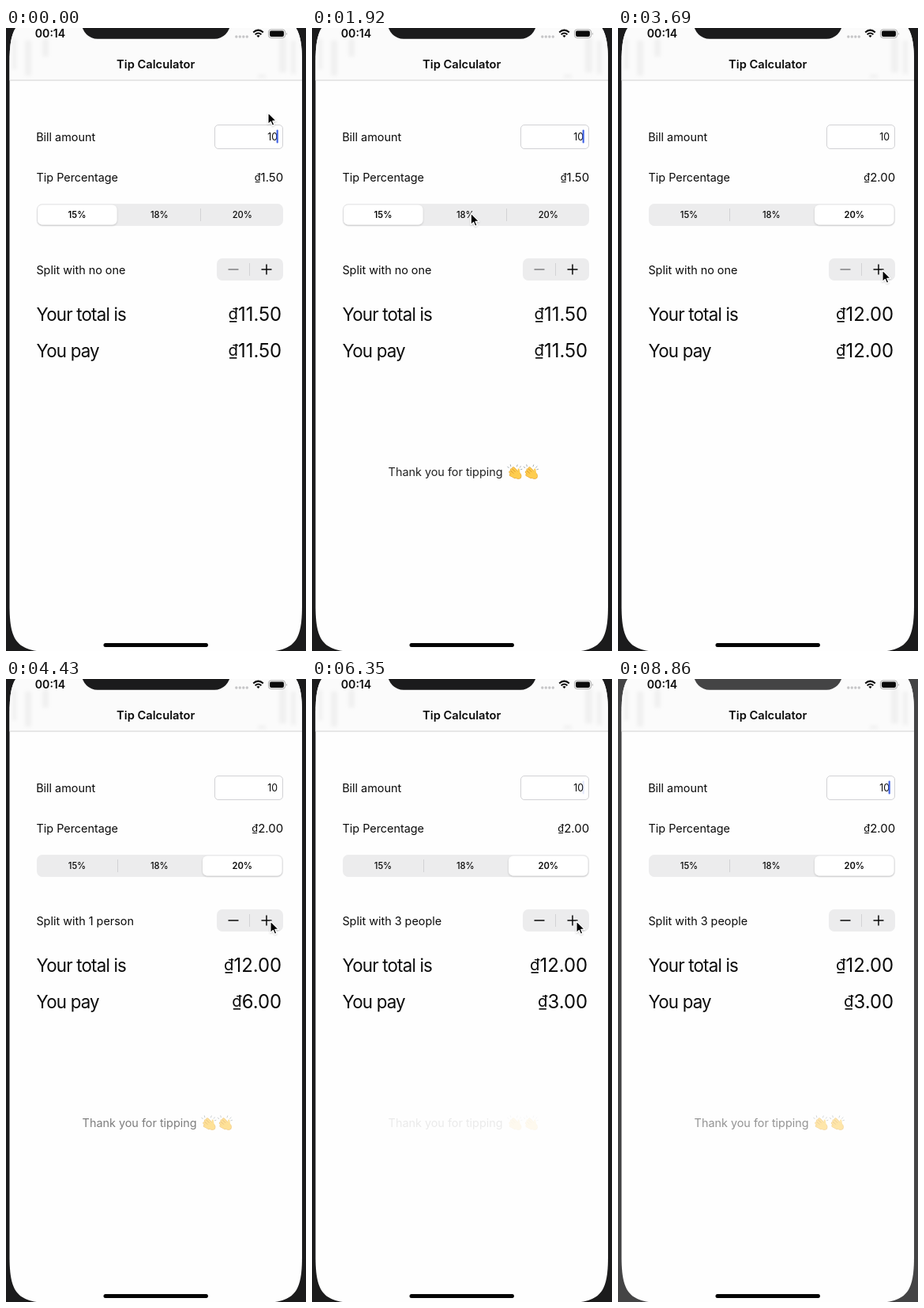
Recreate the animation shown at these times as an HTML page. Size 380 px wide and 787 px high, loop 8.96 s.

```html
<!DOCTYPE html>
<html lang="en">
<head>
<meta charset="utf-8">
<title>Tip Calculator</title>
<style>
  html, body { margin: 0; width: 100%; height: 100%; overflow: hidden; background: #1b1b1c; }
  svg { display: block; width: 380px; height: 787px; }
  text { font: 400 14.4px Inter, Roboto, sans-serif; font-optical-sizing: none; fill: #0a0a0a; }
  .title { font-size: 14.7px; font-weight: 600; text-anchor: middle; }
  .clock { font-size: 14.1px; font-weight: 600; text-anchor: middle; }
  .big { font-size: 22.3px; letter-spacing: -.8px; }
  .money { font-size: 15px; text-anchor: end; }
  .money.sum { font-size: 23.9px; }
  .money tspan:first-child { font-size: .85em; }
  .field { font-size: 12.4px; text-anchor: end; }
  .seg { font-size: 11.2px; font-weight: 500; text-anchor: middle; }
  .seg.on { font-weight: 600; }
  .line { fill: none; stroke: #0a0a0a; stroke-width: 1.5; }
  .sep { stroke: #d2d2d5; stroke-width: 1; }
</style>
</head>
<body>
<svg viewBox="0 0 380 787">
  <defs>
    <clipPath id="screen">
      <path d="M4.5 43C4.5-5.3 15.2-16 63.5-16H316C364.3-16 375-5.3 375 43V729.5C375 777.8 364.3 788.5 316 788.5H63.5C15.2 788.5 4.5 777.8 4.5 729.5Z"/>
    </clipPath>
    <filter id="soft" x="-100%" y="-30%" width="300%" height="160%"><feGaussianBlur stdDeviation="2"/></filter>
    <filter id="shade" x="-20%" y="-30%" width="140%" height="170%">
      <feDropShadow dx="0" dy="1" stdDeviation="1.2" flood-opacity=".2"/>
    </filter>
    <g id="clap" stroke-linecap="round" fill="none">
      <path d="M8 5.5 13.5 11M5.5 7.5 12 13.5M4 10.5 10.5 15.5M4.5 14 10 17" stroke="#e09a1f" stroke-width="3.2"/>
      <ellipse cx="13.2" cy="14.4" rx="5.4" ry="4.2" transform="rotate(40 13.2 14.4)" fill="#ffc83d" stroke="#e09a1f" stroke-width=".6"/>
      <path d="M8 5.5 13.5 11M5.5 7.5 12 13.5M4 10.5 10.5 15.5M4.5 14 10 17M15.5 12 14.7 7.2" stroke="#ffc83d" stroke-width="2.2"/>
      <path d="M2.2 5.2.8 3.6M4.8 3.2 4.3 1.2M12.5 3.4 13.2 1.4M16 4.8 17.6 3.2M17.3 7.3 19 6.8" stroke="#9aa3a8" stroke-width="1"/>
    </g>
  </defs>

  <rect id="bezel" width="380" height="787"/>
  <g clip-path="url(#screen)">
    <rect width="380" height="787" fill="#fefefe"/>
    <rect width="380" height="66" fill="#fbfbfb"/>
    <g fill="#f0f0f0" filter="url(#soft)">
      <rect x="8" y="14" width="5" height="38"/>
      <rect x="24" y="16" width="8" height="44"/>
      <rect x="46" y="14" width="8" height="22"/>
      <rect x="346" y="12" width="9" height="44"/>
      <rect x="361" y="16" width="6" height="42"/>
      <rect x="319" y="59" width="10" height="4"/>
    </g>
    <path d="M0 66H380" stroke="#d2d2d2"/>
  </g>
  <path id="notch" d="M96-6A20 20 0 0 0 116 13.8H264A20 20 0 0 0 284-6Z"/>

  <text class="clock" x="56" y="12">00:14</text>
  <g fill="#c5c5c7">
    <circle cx="291.8" cy="11" r="1.7"/><circle cx="296.3" cy="11" r="1.7"/>
    <circle cx="300.8" cy="11" r="1.7"/><circle cx="305.3" cy="11" r="1.7"/>
  </g>
  <g fill="none" stroke="#0a0a0a" stroke-width="2">
    <path d="M313.2 5.4Q319.5-.2 325.8 5.4M315.6 8.2Q319.5 4.8 323.4 8.2"/>
    <path d="M317.4 9.8Q319.5 8.2 321.6 9.8L319.5 12Z" fill="#0a0a0a" stroke="none"/>
  </g>
  <rect x="332.5" y="2" width="21" height="10.4" rx="3" fill="none" stroke="#a8a8a8"/>
  <rect x="334" y="3.5" width="18" height="7.4" rx="1.8" fill="#0a0a0a"/>
  <path d="M355 5.4Q357 7.2 355 9Z" fill="#a8a8a8"/>
  <text class="title" x="189.7" y="51.3">Tip Calculator</text>

  <text x="38.2" y="143.3">Bill amount</text>
  <rect x="264.5" y="122.5" width="86" height="30" rx="4.5" fill="#fff" stroke="#d2d2d5"/>
  <text class="field" x="344" y="141.5">10</text>
  <rect id="caret" x="342.6" y="128.5" width="2.2" height="17" rx="1" fill="#4466e6"/>

  <text x="38.5" y="194.3">Tip Percentage</text>
  <text id="tip" class="money" x="351.2" y="194.3"><tspan dy="-.12em">₫</tspan><tspan dy=".102em"></tspan></text>

  <rect x="39" y="222" width="312" height="28" rx="7" fill="#ececed"/>
  <path id="sepLeft" class="sep" d="M141.5 228V244"/>
  <path id="sepRight" class="sep" d="M246.5 228V244"/>
  <rect id="pill" y="223.5" width="100.5" height="25" rx="6" fill="#fff" filter="url(#shade)"/>
  <text class="seg" x="90" y="240.2">15%</text>
  <text class="seg" x="194.3" y="240.2">18%</text>
  <text class="seg" x="299.3" y="240.2">20%</text>

  <text id="split" x="38.4" y="310.8"></text>
  <rect x="267" y="291" width="84" height="28" rx="7" fill="#ececed"/>
  <path id="press" d="M309 291H344Q351 291 351 298V312Q351 319 344 319H309Z" fill="#d9d9db"/>
  <path class="sep" d="M308.5 297V313"/>
  <path id="minus" class="line" d="M281.5 305H294.5"/>
  <path class="line" d="M323.5 305H336.5M330 298.5V311.5"/>

  <text class="big" x="38.6" y="370.4">Your total is</text>
  <text id="total" class="money sum" x="349.2" y="370.4"><tspan dy="-.12em">₫</tspan><tspan dy=".102em"></tspan></text>
  <text class="big" x="38.6" y="416.2">You pay</text>
  <text id="pay" class="money sum" x="349.2" y="416.2"><tspan dy="-.12em">₫</tspan><tspan dy=".102em"></tspan></text>

  <g id="thanks">
    <text x="96.6" y="566">Thank you for tipping</text>
    <use href="#clap" x="247" y="550.5"/>
    <use href="#clap" x="267.5" y="550.5"/>
  </g>
  <rect x="123.5" y="777" width="132.5" height="5" rx="2.5" fill="#050505"/>
  <path id="cursor" d="M0 0V14.4L3.3 11.3 5.4 16.3 7.8 15.3 5.7 10.4H10.3Z" fill="#050505" stroke="#fff" stroke-width="1.1" stroke-linejoin="round" filter="url(#shade)"/>
</svg>
<script>
const LOOP = 8960, TICK = 147.7, LAST_TICK = 60;
const BILL = 10, RATES = [.15, .18, .2];
const RATE_CLICKS = [2050, 2940], SPLIT_CLICKS = [4130, 5010, 6190];
const PILL_X = [40, 144, 249];

// time, x, y
const CURSOR = [
  [295, 332, 107], [590, 343, 124], [885, 331, 144], [1180, 317, 151], [1330, 306, 164],
  [1770, 204, 233], [2215, 196, 236], [2660, 291, 234], [2950, 299, 237],
  [3250, 322, 285], [3545, 335, 306], [6800, 335, 306], [7240, 341, 420],
  [7530, 349, 600], [7820, 353, 768],
];

const el = Object.fromEntries([...document.querySelectorAll('[id]')].map(e => [e.id, e]));
const segments = document.querySelectorAll('.seg');
const clamp = v => Math.min(1, Math.max(0, v));
const ease = v => v * v * (3 - 2 * v);
const mix = (a, b, p) => a + (b - a) * p;
const countPast = (times, t) => times.filter(c => t >= c).length;
const showMoney = (text, v) => { text.lastChild.textContent = v.toFixed(2); };

function cursorAt(t) {
  const next = CURSOR.findIndex(k => k[0] > t);
  if (next < 1) return next ? CURSOR.at(-1).slice(1) : CURSOR[0].slice(1);
  const [t0, x0, y0] = CURSOR[next - 1], [t1, x1, y1] = CURSOR[next];
  const p = (t - t0) / (t1 - t0);
  return [mix(x0, x1, p), mix(y0, y1, p)];
}

function thanksOpacity(t) {
  const START = 740, HALF = 1465;
  if (t < START) return 0;
  const phase = (t - START) / HALF % 2;
  return ease(phase < 1 ? phase : 2 - phase);
}

function caretOpacity(t) {
  const phase = (t + 200) % 1000;
  return clamp((560 - phase) / 60);
}

function draw(t) {
  const choice = countPast(RATE_CLICKS, t);
  const others = countPast(SPLIT_CLICKS, t);
  const slide = RATE_CLICKS.reduce((sum, c) => sum + ease(clamp((t - c) / 300)), 0);
  const from = Math.min(1, Math.floor(slide));
  const tip = BILL * RATES[choice];

  showMoney(el.tip, tip);
  showMoney(el.total, BILL + tip);
  showMoney(el.pay, (BILL + tip) / (others + 1));
  el.split.textContent = 'Split with ' + ['no one', '1 person', '2 people', '3 people'][others];
  segments.forEach((s, i) => s.classList.toggle('on', i === choice));

  el.pill.setAttribute('x', mix(PILL_X[from], PILL_X[from + 1], slide - from));
  el.sepLeft.style.opacity = clamp(slide - 1);
  el.sepRight.style.opacity = clamp(1 - slide);
  el.minus.style.stroke = others ? '#0a0a0a' : '#808083';
  el.press.style.opacity = SPLIT_CLICKS.some(c => t >= c - TICK && t < c) ? 1 : 0;

  el.caret.style.opacity = caretOpacity(t);
  el.thanks.style.opacity = thanksOpacity(t);

  const [x, y] = cursorAt(t);
  el.cursor.setAttribute('transform', `translate(${x} ${y})`);
  el.cursor.style.opacity = t < 7900 ? 1 : 0;

  const level = Math.round(mix(27, 68, clamp((t - 8122) / 738)));
  el.bezel.style.fill = el.notch.style.fill = `rgb(${level},${level},${level + 1})`;
}

const start = performance.now();
function frame() {
  const t = (performance.now() - start) % LOOP;
  draw(Math.min(LAST_TICK, Math.floor((t + 6) / TICK)) * TICK);
  requestAnimationFrame(frame);
}
frame();
</script>
</body>
</html>
```
